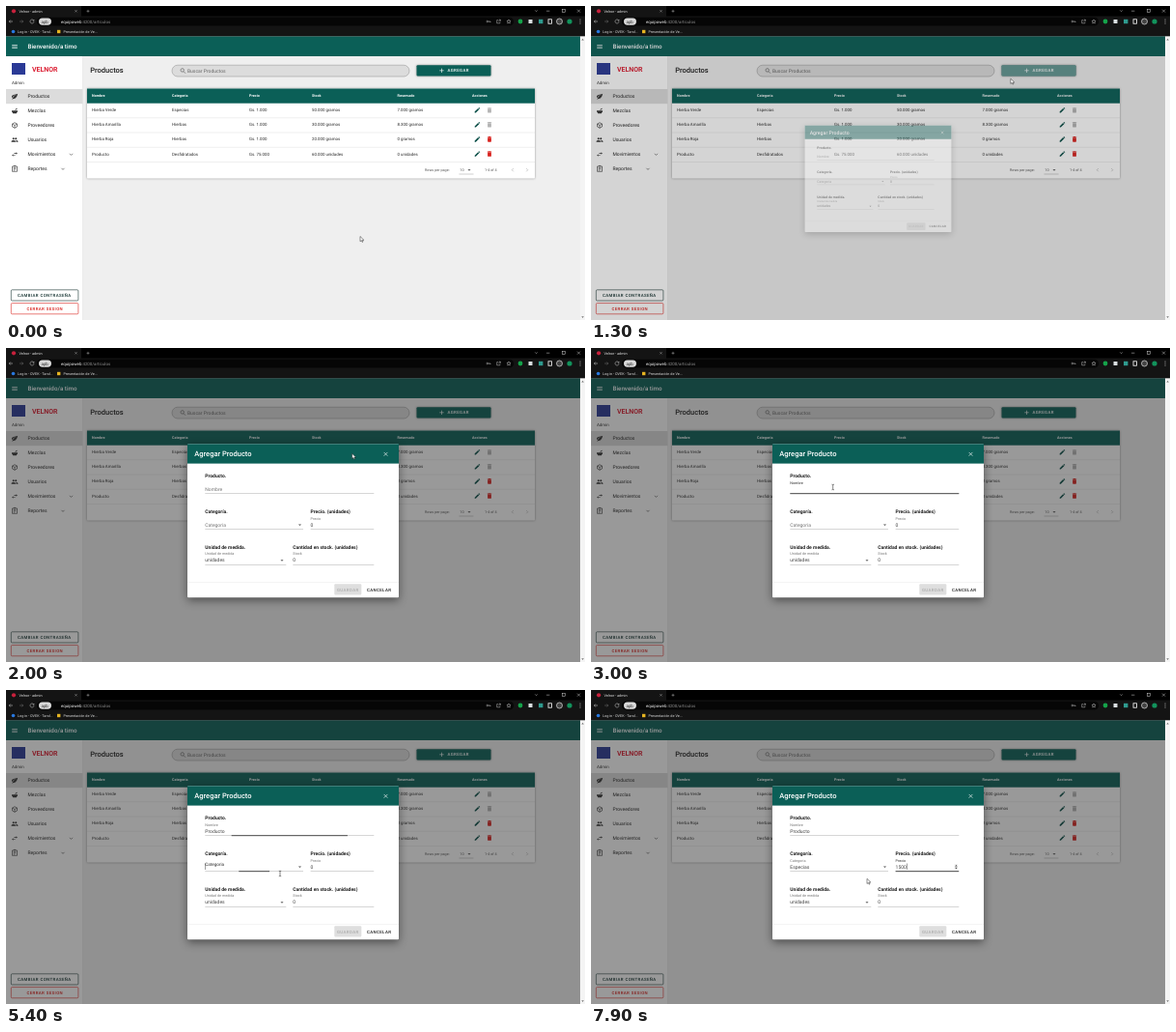
Animation of 600 by 325 pixels, one loop 8000 ms. Source, as an HTML page:

```html
<!DOCTYPE html>
<html lang="es">
<head>
<meta charset="utf-8">
<style>
html, body { margin: 0; width: 100%; height: 100%; overflow: hidden; background: #efefef; }
svg { display: block; width: 600px; height: 325px; }
text { font-family: Roboto, Arial, sans-serif; text-rendering: geometricPrecision; white-space: pre; }
.card { filter: drop-shadow(0 .7px .8px #0006); }
.raised { filter: drop-shadow(0 3px 5px #0007); }
</style>
</head>
<body>
<svg id="stage" viewBox="0 0 600 325"></svg>
<script>
const TEAL = '#0b5f57', INK = '#2b2b2b', GRAY = '#757575', RED = '#d8201c';

// Markup helpers
const rect = (x, y, w, h, fill, more = '') =>
  `<rect x="${x}" y="${y}" width="${w}" height="${h}" fill="${fill}" ${more}/>`;
const text = (x, y, s, size = 5, fill = INK, weight = 400, more = '') =>
  `<text x="${x}" y="${y}" font-size="${size}" fill="${fill}" font-weight="${weight}" ${more}>${s}</text>`;
const dot = (x, y, r, fill, more = '') => `<circle cx="${x}" cy="${y}" r="${r}" fill="${fill}" ${more}/>`;
const line = (d, color, width = .6) => `<path d="${d}" fill="none" stroke="${color}" stroke-width="${width}"/>`;
const caps = (x, y, s, fill, weight = 500) => text(x, y, s, 4.375, fill, weight, 'letter-spacing=".39"');
// Icons live on a 24 unit grid, centred at x, y
const icon = (x, y, name, color, size = 7.5) =>
  `<path transform="translate(${x} ${y}) scale(${size / 24}) translate(-12 -12)" d="${ICONS[name]}" ` +
  (OUTLINED.includes(name) ? `fill="none" stroke="${color}" stroke-width="2"/>` : `fill="${color}"/>`);

const OUTLINED = ['menu', 'search', 'plus', 'close', 'down', 'left', 'right', 'back', 'forward', 'reload', 'box', 'list', 'star', 'share', 'key'];
const ICONS = {
  menu: 'M3 7H21M3 12H21M3 17H21',
  search: 'M15 9.5A5.5 5.5 0 1 1 4 9.5A5.5 5.5 0 1 1 15 9.5M14 14L20 20',
  plus: 'M5 12H19M12 5V19',
  close: 'M6 6L18 18M18 6L6 18',
  down: 'M7 9.5L12 14.5L17 9.5',
  left: 'M14.5 7L9.5 12L14.5 17',
  right: 'M9.5 7L14.5 12L9.5 17',
  back: 'M20 12H5M11 6L5 12L11 18',
  forward: 'M4 12H19M13 6L19 12L13 18',
  reload: 'M19 8A8 8 0 1 0 20 13M20 4V9H15',
  caret: 'M7 10L12 15L17 10Z',
  pencil: 'M3 17.2V21H6.8L17.8 9.9L14 6.2ZM15.1 5.1L18.9 8.9L21 6.5L17.5 3Z',
  trash: 'M19 4H15.5L14.5 3H9.5L8.5 4H5V6H19ZM6 7V19Q6 21 8 21H16Q18 21 18 19V7Z',
  leaf: 'M17 8C8 10 6 16 3.8 21.3L5.7 22L6.7 19.7C19 22 22 3 22 3C20 6 2 4 2 13.5Q2 15.5 3.8 17.2C7 8 17 8 17 8Z',
  bowl: 'M2 11H22Q22 16 18 19V21H6V19Q2 16 2 11ZM12 9L19 3L21 5L16 9Z',
  box: 'M12 3L20 7.5V16.5L12 21L4 16.5V7.5ZM4 7.5L12 12L20 7.5M12 12V21',
  people: 'M8 5A3.3 3.3 0 1 1 7.9 5ZM16 5A3.3 3.3 0 1 1 15.9 5ZM1 19V17Q1 13.5 8 13.5Q15 13.5 15 17V19ZM17 19V17Q17 15 15.5 13.6Q23 13.5 23 17V19Z',
  swap: 'M21 9L17 5V8H10V10H17V13ZM7 11L3 15L7 19V16H14V14H7Z',
  list: 'M4 4H20V21H4ZM9 4V2H15V4M8 9H16M8 13H16M8 17H13',
  star: 'M12 3L14.7 9L21 9.6L16.2 14L17.6 20.5L12 17L6.4 20.5L7.8 14L3 9.6L9.3 9Z',
  share: 'M10 6H4V20H18V14M13 4H20V11M20 4L11 13',
  key: 'M10 12A3.5 3.5 0 1 1 3 12A3.5 3.5 0 1 1 10 12H21V16M17 12V15'
};

function browser() {
  const pale = '#d5d5d5';
  const nav = ['back', 'forward', 'reload'].map((n, i) => icon(5 + 11 * i, 16, n, i === 1 ? '#777' : pale, 6)).join('');
  const tools = ['key', 'share', 'star'].map((n, i) => icon(500 + 10.5 * i, 16, n, pale, 5.5)).join('');
  return rect(0, 0, 600, 31.3, '#141414') + rect(78, 0, 522, 10.5, '#000') +
    dot(8, 5.3, 2.1, '#c8203c') + text(13.5, 7, 'Velnor - admin', 3.75, '#e8e8e8') +
    icon(72.5, 5.3, 'close', pale, 4.5) + icon(85, 5.3, 'plus', pale, 5) +
    icon(549.5, 5, 'down', pale, 6) + line('M560 5.2h3.4M592 3.6l3 3m0-3l-3 3', pale, .5) +
    rect(576.5, 3.6, 3, 3, 'none', `stroke="${pale}" stroke-width=".5"`) +
    nav + rect(32, 11.8, 494, 8.8, '#060606', 'rx="4.4"') +
    rect(34, 12.4, 13, 7.4, '#dadada', 'rx="3.7"') + text(36.5, 17.6, 'apb', 4.4, '#222') +
    text(57, 17.7, 'equipoweb<tspan fill="#8d8d8d">:4200/articulos</tspan>', 4.4, '#eee') + tools +
    dot(533, 16, 2.4, '#15a34a') + rect(541.5, 14, 4, 4, '#d9dee0') + rect(552, 13.8, 4.4, 4.4, '#2f9b8f') +
    rect(562, 13.8, 3.6, 4.4, 'none', 'stroke="#fff" stroke-width=".8"') +
    dot(573.5, 16, 3, '#444', 'stroke="#ddd" stroke-width=".7"') + dot(584, 16, 2.6, '#12935c') +
    [14, 16, 18].map(y => dot(595, y, .5, pale)).join('') +
    dot(7.5, 26.5, 1.8, '#2878e0') + text(12, 28, 'Log in - OVEK - Tand...', 3.75, '#ddd') +
    rect(53, 24.8, 3.4, 3.4, '#e6b422') + text(59.5, 28, 'Presentación de Ve...', 3.75, '#ddd');
}

function sidebar() {
  const items = [['Productos', 'leaf'], ['Mezclas', 'bowl'], ['Proveedores', 'box'], ['Usuarios', 'people'], ['Movimientos', 'swap', 67.5], ['Reportes', 'list', 59]];
  const outlined = (y, x, label, color) =>
    rect(5.3, y, 69.6, 11.2, '#fff', `rx="1" stroke="${color}" stroke-width=".6"`) + caps(x, y + 7.2, label, color);
  return rect(0, 51, 79.7, 274, '#fff') + rect(79.5, 51, .4, 274, '#d5d5d5') +
    rect(6, 59, 14, 12, '#2b3a96') + text(27, 67.7, 'VELNOR', 7, '#dc2034', 700) +
    text(6, 81.3, 'Admin', 4.375) + rect(0, 86, 79.5, 15.2, '#dcdcdc') +
    items.map(([label, name, chevron], i) => icon(9, 93.5 + 15 * i, name, '#333') +
      text(22.5, 95.3 + 15 * i, label, 5, '#222') + (chevron ? icon(chevron, 93.6 + 15 * i, 'down', '#444') : '')).join('') +
    outlined(293.8, 12, 'CAMBIAR CONTRASEÑA', '#12302e') + outlined(307.6, 21.5, 'CERRAR SESION', RED);
}

function table() {
  const cols = [89, 172, 252, 317, 405.5, 483];
  const heads = ['Nombre', 'Categoria', 'Precio', 'Stock', 'Reservado', 'Acciones'];
  const rows = [
    ['Hierba Verde', 'Especias', 'Gs. 1.000', '50.000 gramos', '7.000 gramos'],
    ['Hierba Amarilla', 'Hierbas', 'Gs. 1.000', '30.000 gramos', '8.300 gramos'],
    ['Hierba Roja', 'Hierbas', 'Gs. 1.000', '20.000 gramos', '0 gramos'],
    ['Producto', 'Desfidratados', 'Gs. 75.000', '60.000 unidades', '0 unidades']
  ];
  return `<g class="card">${rect(84, 85.5, 464, 93, '#fff', 'rx="1"')}</g>` + rect(84, 85.5, 464, 15.2, TEAL) +
    heads.map((h, i) => text(cols[i], 94.4, h, 3.75, '#fff', 700)).join('') +
    rows.map((row, r) => {
      const y = 109.2 + 15.1 * r;
      return row.map((s, i) => text(cols[i], y, s, 4.375)).join('') +
        icon(488.5, y - 1.5, 'pencil', '#0b4f48') + icon(501, y - 1.5, 'trash', r < 2 ? '#b3b3b3' : RED) +
        rect(84, y + 6.5, 464, .4, '#d6d6d6');
    }).join('') +
    text(434, 171, 'Rows per page:', 3.75, '#555') + text(470.3, 171, '10', 3.75, '#555') + icon(480, 169.7, 'caret', '#666') +
    rect(469.5, 173.8, 15, .4, '#888') + text(496, 171, '1-4 of 4', 3.75, '#555') +
    icon(525, 169.7, 'left', '#aaa') + icon(540, 169.7, 'right', '#aaa');
}

function page() {
  return rect(0, 31, 600, 294, '#efefef') + sidebar() +
    rect(0, 31.3, 595, 20.7, TEAL) + icon(9, 42, 'menu', '#fff') + text(22.5, 44.3, 'Bienvenido/a timo', 6.25, '#fff', 500) +
    text(87.3, 69.2, 'Productos', 7.5, '#1c1c1c', 500) +
    rect(172, 61.2, 246, 11.8, '#dcdcdc', 'rx="5.9" stroke="#8a8a8a" stroke-width=".5"') +
    icon(183.5, 67.2, 'search', '#555') + text(188, 69, 'Buscar Productos', 5, '#666') +
    `<g class="card">${rect(425.5, 61.2, 77, 11.2, TEAL, 'rx="1"')}</g>` +
    `<g clip-path="url(#button)">${rect(425.5, 61.2, 77, 11.2, '#fff', 'id="hover"')}${dot(0, 66.8, 1, '#fff', 'id="ripple"')}</g>` +
    icon(451.5, 66.8, 'plus', '#fff') + caps(457.5, 68.4, 'AGREGAR', '#fff') + table();
}

const fields = [
  { id: 'name', x: 206.3, w: 175, y: 150.5, label: 'Nombre', on: 2450, off: 5368 },
  { id: 'cat', x: 206.3, w: 101.7, y: 187.5, label: 'Categoria', on: 5368, off: 6850 },
  { id: 'price', x: 315.6, w: 65.6, y: 187.5, label: 'Precio', on: 6850, off: 9e9, filled: true },
  { id: 'unit', x: 206.3, w: 84, y: 224.3, label: 'Unidad de medida', on: 9e9, off: 9e9, filled: true },
  { id: 'stock', x: 297.3, w: 84, y: 224.3, label: 'Stock', on: 9e9, off: 9e9, filled: true }
];

function dialog() {
  const heads = [[206.3, 133.8, 'Producto.'], [206.3, 170.8, 'Categoría.'], [315.6, 170.8, 'Precio. (unidades)'],
    [206.3, 207.6, 'Unidad de medida.'], [297.3, 207.6, 'Cantidad en stock. (unidades)']];
  const options = ['Especias', 'Hierbas', 'Desfidratados', 'Semillas', 'Infusiones', 'Mezclas'];
  return `<g id="dialog"><g class="raised">${rect(188, 99.3, 219, 159, '#fff', 'rx="1"')}</g>` +
    rect(188, 99.3, 219, 20.3, TEAL) + text(195.3, 112.4, 'Agregar Producto', 7.5, '#fff', 500) + icon(393.5, 109.8, 'close', '#fff') +
    heads.map(([x, y, s]) => text(x, y, s, 5, '#1d1d1d', 700)).join('') +
    fields.map(f => rect(f.x, f.y, f.w, .35, '#8a8a8a') + rect(0, f.y - .1, 0, .75, '#1e1e1e', `id="${f.id}Line"`) +
      text(f.x, 0, f.label, 5, GRAY, 400, `id="${f.id}Label"`) + text(f.x, f.y - 3, '', 5, '#444', 400, `id="${f.id}Value"`) +
      rect(0, f.y - 8, .4, 6.5, '#111', `id="${f.id}Caret"`)).join('') +
    `<g id="catArrow">${icon(304.5, 183, 'caret', '#555')}</g>` + icon(286, 219.8, 'caret', '#555') +
    `<g id="spin">${rect(376.6, 180.2, 3.5, 5.8, '#eee')}<path d="M377.2 182.5l1.2-1.6 1.2 1.6zM377.2 183.7l1.2 1.6 1.2-1.6z" fill="#444"/></g>` +
    rect(188, 242, 219, .35, '#dedede') + rect(340.3, 244.3, 28, 11.2, '#dedede', 'rx="1"') +
    caps(343, 251.5, 'GUARDAR', '#adadad') + caps(374, 251.5, 'CANCELAR', '#1d1d1d') +
    `<g id="menu"><g class="card">${rect(206.3, 188, 102, 95, '#fff', 'rx="1"')}</g>${rect(206.3, 190.5, 102, 15, '#ececec', 'id="active"')}` +
    options.map((s, i) => text(211.3, 199.8 + 15 * i, s)).join('') + '</g></g>';
}

const pointer = '<g id="cursor"><path id="arrow" d="M0 0V5.2L1.3 4.1L2.1 5.9L3 5.5L2.2 3.8H3.9Z" fill="#fff" stroke="#111" stroke-width=".45"/>' +
  '<path id="hand" d="M-.5 0Q.3-.6.7 0V2.2L3 2.8Q3.8 3 3.6 4L3 6.2H0L-2 3.8Q-1.8 2.9-.5 3.6Z" fill="#fff" stroke="#111" stroke-width=".45"/>' +
  '<path id="beam" d="M-1.2-2.8Q0-2.8 0-2.2Q0-2.8 1.2-2.8M0-2.2V2.2M-1.2 2.8Q0 2.8 0 2.2Q0 2.8 1.2 2.8" fill="none" stroke="#222" stroke-width=".55"/></g>';

const stage = document.getElementById('stage');
stage.innerHTML = '<clipPath id="button"><rect x="425.5" y="61.2" width="77" height="11.2" rx="1"/></clipPath>' +
  page() + rect(0, 31.3, 595, 293.7, '#212121', 'id="dim"') + rect(595, 31.3, 5, 293.7, '#f4f4f4') +
  '<path d="M596.3 35.5l1.3-1.7 1.3 1.7zM596.3 321.3l1.3 1.7 1.3-1.7z" fill="#777"/>' + browser() + dialog() + pointer;

const el = {};
stage.querySelectorAll('[id]').forEach(e => el[e.id] = e);
const set = (id, attrs) => { for (const k in attrs) el[id].setAttribute(k, attrs[k]); };
const show = (id, on) => set(id, { visibility: on ? 'visible' : 'hidden' });

const clamp = v => Math.max(0, Math.min(1, v));
const mix = (a, b, p) => a + (b - a) * p;
// cubic-bezier(.25, .8, x2, 1)
function ease(p, x2 = .5) {
  p = clamp(p);
  let lo = 0, hi = 1;
  for (let i = 0; i < 18; i++) {
    const s = (lo + hi) / 2, q = 1 - s;
    if (.75 * q * q * s + 3 * x2 * q * s * s + s ** 3 < p) lo = s; else hi = s;
  }
  const q = 1 - lo;
  return 2.4 * q * q * lo + 3 * q * lo * lo + lo ** 3;
}

// time, x, y
const path = [[0, 367, 238.5], [400, 367, 238.5], [1050, 445.5, 69.5], [1220, 445.5, 69.5], [1400, 420.5, 83], [1800, 400, 96],
  [2380, 250.7, 144], [4800, 250.7, 144], [5300, 284, 190], [5450, 284, 190], [5850, 242.5, 199.5], [6250, 242.5, 199.5],
  [6750, 322, 183], [6900, 322, 183], [7250, 286, 195.3], [8000, 286, 195.3]];
function cursorAt(t) {
  const i = path.findIndex(k => k[0] > t), a = path[i - 1], b = path[i];
  let p = (t - a[0]) / (b[0] - a[0]);
  p = p * p * (3 - 2 * p);
  return [mix(a[1], b[1], p), mix(a[2], b[2], p)];
}

function values(t) {
  const typed = (s, start, step) => s.slice(0, Math.max(0, Math.floor((t - start) / step) + 1));
  return {
    name: typed('Producto', 3300, 150),
    cat: t < 6040 ? '' : 'Especias',
    price: typed('1500', 7250, 170) || '0',
    unit: 'unidades', stock: '0'
  };
}

function drawFields(t) {
  const value = values(t);
  for (const f of fields) {
    const focus = ease((t - f.on) / 300) - ease((t - f.off) / 300);
    const up = f.filled ? 1 : ease((t - f.on) / 300);
    const active = t >= f.on && t < f.off;
    set(f.id + 'Line', { x: f.x + f.w * (1 - focus) / 2, width: f.w * focus });
    set(f.id + 'Label', { y: f.y - mix(3, 10, up), 'font-size': mix(5, 3.75, up), fill: active ? INK : GRAY });
    el[f.id + 'Value'].textContent = value[f.id];
    const lastInput = [f.on, 4350, 6040, 7760].filter(k => k >= f.on && k <= t).pop();
    const typing = (t > 3300 && t < 4400) || (t > 7250 && t < 7760);
    show(f.id + 'Caret', active && (typing || (t - lastInput) % 1000 < 500));
    if (active) set(f.id + 'Caret', { x: f.x + .2 + (value[f.id] ? el[f.id + 'Value'].getComputedTextLength() : 0) });
  }
}

function draw(t) {
  const open = ease((t - 1265) / 300, .25), scale = mix(.5, 1, open);
  set('dialog', { opacity: open, transform: `translate(297.5 178.8) scale(${scale}) translate(-297.5 -178.8)` });
  set('dim', { opacity: .46 * ease((t - 1255) / 300) });

  const ripple = ease((t - 1130) / 250), fade = 1 - clamp((t - 1450) / 350);
  set('hover', { opacity: t > 980 ? .12 * fade : 0 });
  set('ripple', { cx: mix(445.5, 464, ripple), r: mix(4, 44, ripple), opacity: t > 1130 ? .27 * fade : 0 });

  drawFields(t);
  const menu = t >= 5430 && t < 6040;
  show('menu', menu);
  const turn = 180 * (ease((t - 5430) / 300) - ease((t - 6040) / 300));
  set('catArrow', { transform: `rotate(${turn} 304.5 183.4)` });
  show('spin', t >= 6850);

  const [x, y] = cursorAt(t);
  const over = (x0, y0, x1, y1) => x > x0 && x < x1 && y > y0 && y < y1;
  const hand = over(425, 61, 503, 73) || menu && over(206, 188, 308, 283);
  const beam = !hand && t > 1500 && (over(206, 138, 381, 152) || over(206, 176, 308, 192) || over(315, 176, 381, 189));
  show('active', over(206, 190, 308, 206));
  if (!menu) show('active', false);
  show('hand', hand);
  show('beam', beam);
  show('arrow', !hand && !beam);
  set('cursor', { transform: `translate(${x} ${y})` });
}

function tick() {
  draw(performance.now() % 8000);
  requestAnimationFrame(tick);
}
tick();
</script>
</body>
</html>
```
